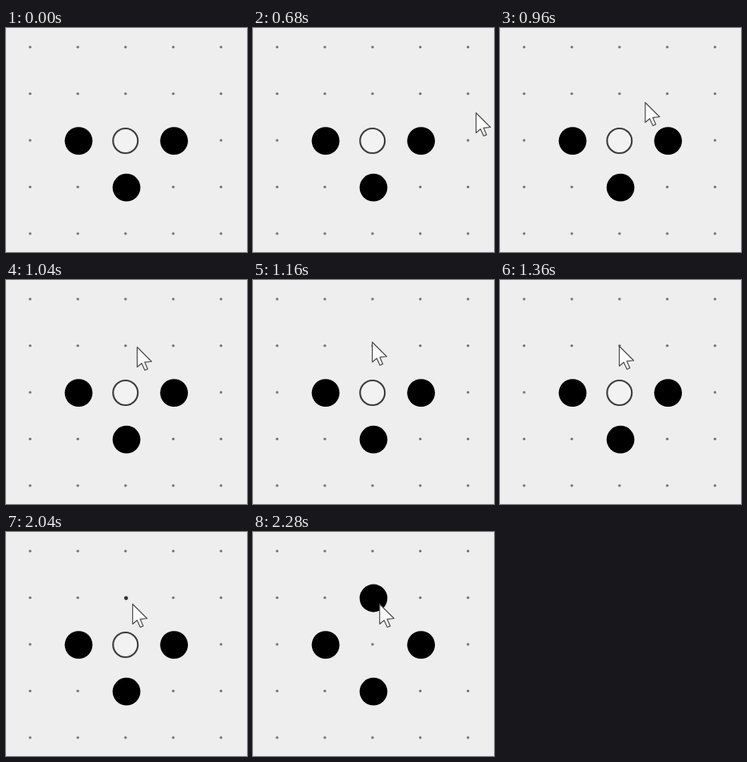
These frames come from a looping animation (302x281 px, 2840 ms). An HTML page:

```html
<!DOCTYPE html>
<html lang="en">
<head>
<meta charset="utf-8">
<title>Capturing a stone</title>
<style>
  html, body { margin: 0; width: 100%; height: 100%; overflow: hidden; background: #eee; }
  svg { display: block; width: 302px; height: 281px; filter: blur(0.55px); }
</style>
</head>
<body>
<svg id="board" viewBox="0 0 302 281">
  <g id="grid" fill="#777"></g>
  <circle id="white" cx="149.7" cy="141.5" r="15.5" fill="#f2f2f2" stroke="#3c3c3c" stroke-width="2.1"/>
  <g id="stones"></g>
  <circle id="seed" cx="150.5" cy="83" r="2.4" fill="#333"/>
  <path id="cursor" d="M0 0V25L5.6 20.2L9.6 29L13.2 27.4L9.4 18.8L18 18Z"
        fill="#fcfcfc" stroke="#4a4a4a" stroke-width="1.2" stroke-linejoin="round"/>
</svg>
<script>
  const LOOP = 2840, STEP = 40;
  const ENTER = 680, PRESS = 2040, PLACE = 2280;

  // Cursor tip: time, x, y
  const PATH = [
    [680, 279.5, 106.5], [760, 250, 110], [840, 221, 109.5], [960, 182, 93.5],
    [1060, 161, 82.5], [1160, 149.5, 78], [1240, 146, 78.5],
    [1360, 149.5, 83], [1520, 158.7, 90.5]
  ];

  const $ = id => document.getElementById(id);

  function addCircle(parent, cx, cy, r) {
    const circle = document.createElementNS('http://www.w3.org/2000/svg', 'circle');
    for (const [name, value] of Object.entries({ cx, cy, r })) circle.setAttribute(name, value);
    parent.appendChild(circle);
    return circle;
  }

  for (let row = 0; row < 5; row++)
    for (let col = 0; col < 5; col++)
      addCircle($('grid'), 30.2 + col * 59.8, 23.9 + row * 58.5, 1.7);

  const stone = (x, y) => addCircle($('stones'), x, y, 17.4);
  stone(91, 141.6);
  stone(210.6, 141.6);
  stone(151, 200.2);
  const placed = stone(151, 83);

  const show = (element, visible) =>
    element.setAttribute('visibility', visible ? 'visible' : 'hidden');

  // Hermite slope at a path point, with the ends at rest
  function slope(i, axis) {
    const before = PATH[i - 1], after = PATH[i + 1];
    return before && after ? (after[axis] - before[axis]) / (after[0] - before[0]) : 0;
  }

  function cursorAt(time) {
    const last = PATH.length - 1;
    if (time >= PATH[last][0]) return PATH[last].slice(1);
    const i = Math.max(0, PATH.findIndex(point => point[0] > time) - 1);
    const a = PATH[i], b = PATH[i + 1], span = b[0] - a[0];
    const u = Math.max(0, (time - a[0]) / span), v = 1 - u;
    return [1, 2].map(axis =>
      v * v * (1 + 2 * u) * a[axis] + u * u * (3 - 2 * u) * b[axis] +
      span * u * v * (v * slope(i, axis) - u * slope(i + 1, axis)));
  }

  function render(time) {
    const t = Math.floor((time % LOOP) / STEP) * STEP;
    show($('white'), t < PLACE);
    show(placed, t >= PLACE);
    show($('seed'), t >= PRESS && t < PLACE);
    show($('cursor'), t >= ENTER);
    $('cursor').setAttribute('transform', `translate(${cursorAt(t)})`);
  }

  const start = performance.now();
  function tick() {
    render(performance.now() - start);
    requestAnimationFrame(tick);
  }
  tick();
</script>
</body>
</html>
```
